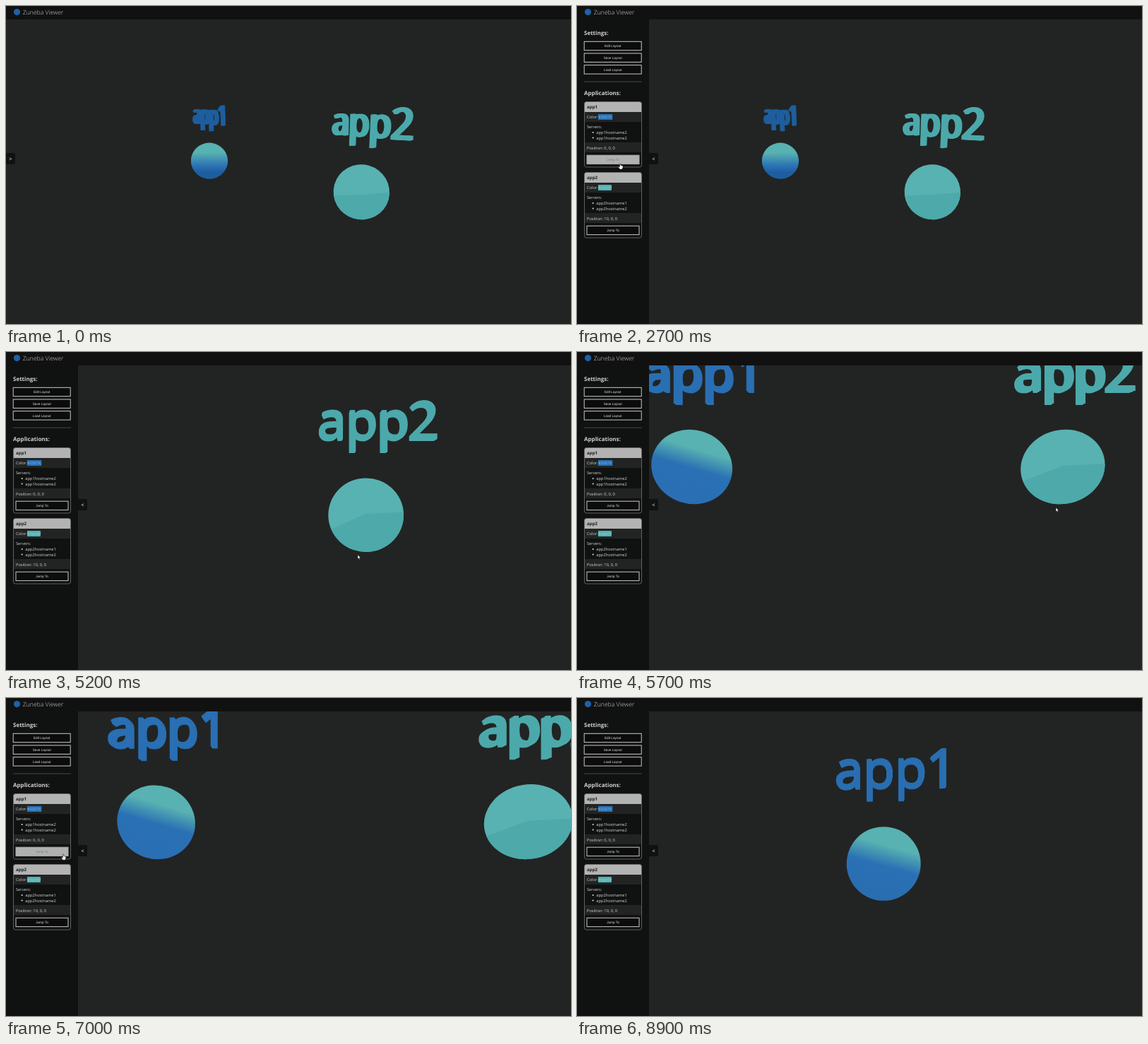
Write an HTML page with a canvas that moves like this. It is 800 by 450 pixels and loops after 9000 ms.

```html
<!DOCTYPE html>
<html lang="en">
<head>
<meta charset="utf-8">
<title>Scene viewer</title>
<style>
  html, body { margin: 0; width: 100%; height: 100%; overflow: hidden; background: #222423; }
  canvas, svg { position: absolute; left: 0; top: 0; width: 800px; height: 450px; }
  svg { font: 5.7px "Open Sans", sans-serif; fill: #d4d4d4; text-rendering: geometricPrecision; }
  .heading { font-size: 8px; font-weight: 700; fill: #cfcfcf; }
  .name { font-size: 6.2px; font-weight: 700; fill: #222; }
  .button rect { fill: #0c0c0c; stroke: #c8c8c8; }
  .button text { font: 4.7px "Liberation Sans", Arial, sans-serif; text-anchor: middle; fill: #e4e4e4; }
  .button.hover rect { fill: #b0b0b0; stroke: #b0b0b0; }
  .button.hover text { fill: #777; }
</style>
</head>
<body>
<canvas id="scene" width="800" height="450"></canvas>
<svg id="ui" viewBox="0 0 800 450"></svg>
<script>
const LOOP = 9000, FOCAL = 520, CENTER_X = 400, CENTER_Y = 234.5;
const ctx = document.getElementById('scene').getContext('2d');
const ui = document.getElementById('ui');

// ---------- interface ----------
const button = (x, y, w, label, id = '') => `<g class="button" id="${id}">
  <rect x="${x + .5}" y="${y + .5}" width="${w - 1}" height="12.4"/>
  <text x="${x + w / 2}" y="${y + 8.3}">${label}</text></g>`;

const band = (y, h, fill) => `<rect x="10.5" y="${y}" width="81" height="${h}" fill="${fill}"/>`;

const card = (y, name, fill, ink, code, width, servers, position) => `
  <g transform="translate(0 ${y})">
    <rect x="10.5" y=".5" width="81" height="92.5" rx="3" fill="#101111"/>
    <path d="M10.5 15V3q0-2.5 3-2.5h75q3 0 3 2.5v12z" fill="#b3b3b3"/>
    ${band(15, 14, '#222423')}${band(58, 14, '#222423')}
    <rect x="10.5" y=".5" width="81" height="92.5" rx="3" fill="none" stroke="#6a6a6a" stroke-width=".9"/>
    <text class="name" x="14" y="9.8">${name}</text>
    <text x="14" y="24.2">Color:</text>
    <rect x="30" y="18" width="${width}" height="8" fill="${fill}"/>
    <text x="30.3" y="24.1" style="font-size:5.2px" fill="${ink}">${code}</text>
    <text x="14" y="38.4">Servers:</text>
    ${servers.map((s, i) => `<circle cx="22.7" cy="${44 + 7.5 * i}" r="1.1"/>
      <text x="27.3" y="${46 + 7.5 * i}">${s}</text>`).join('')}
    <text x="14" y="67.6">Position: ${position}</text>
    ${button(13.5, 75.7, 75, 'Jump To', name)}
  </g>`;

ui.innerHTML = `
  <g id="panel">
    <rect y="19" width="102" height="431" fill="#101111"/>
    <path d="M102 208h11q2 0 2 2v12q0 2-2 2h-11z" fill="#101111"/>
    <text id="arrow" x="108.5" y="218.8" text-anchor="middle" style="font-size:7.5px;font-weight:600">&lt;</text>
    <text class="heading" x="10" y="41">Settings:</text>
    ${['Edit', 'Save', 'Load'].map((verb, i) => button(9.7, 49.8 + 16.7 * i, 82, verb + ' Layout')).join('')}
    <rect x="10" y="106.7" width="82" height=".8" fill="#555"/>
    <text class="heading" x="10" y="125.8">Applications:</text>
    ${card(135, 'app1', '#2a70b4', '#79b8ea', '#0287fc', 20.3, ['app1hostname2', 'app1hostname2'], '0, 0, 0')}
    ${card(235, 'app2', '#55b0b0', '#8ad6d6', '#4abfbf', 18.8, ['app2hostname1', 'app2hostname2'], '10, 0, 0')}
  </g>
  <rect width="800" height="19" fill="#111"/>
  <circle cx="15.5" cy="8.6" r="4.6" fill="#1d62a6"/>
  <text x="23.8" y="12" style="font-size:8.6px;font-weight:300">Zuneba Viewer</text>
  <g id="cursor" fill="#fff" stroke="#000" stroke-width=".5">
    <path id="pointer" d="M0 0v6l1.4-1.2.9 2 1-.4-.9-2h1.8z"/>
    <path id="hand" d="M-.6 0q.8-.6 1.3.2v2.2l2.6.6q.9.3.8 1.2l-.5 2.6-.7 1.2h-3.4l-2.2-3.4q.6-.8 1.4-.1l.7.6z"/>
  </g>`;
const el = Object.fromEntries(['panel', 'arrow', 'cursor', 'pointer', 'hand', 'app1', 'app2']
  .map(id => [id, document.getElementById(id)]));

// ---------- motion ----------
const lerp = (a, b, k) => a + (b - a) * k;
const clamp = k => Math.max(0, Math.min(1, k));
const linear = k => k;
const inOut = k => k < .5 ? 2 * k * k : 1 - 2 * (1 - k) ** 2;

// Camera poses: x, y, z, yaw to the left, pitch downwards.
const START = [17.4, 3.24, 11.03, .7915, .189];
const MOVES = [
  [3350, 4250, [10, -.03, 10, .13, 0], inOut],
  [4850, 5200, [7.92, -.07, 10, 0, 0], linear],
  [5200, 5600, [4.52, -1.37, 10, 0, 0], linear],
  [6700, 7700, [0, 0, 10, .065, 0], inOut],
];
function cameraAt(t) {
  let pose = START;
  for (const [from, to, target, ease] of MOVES) {
    const k = ease(clamp((t - from) / (to - from)));
    pose = pose.map((v, i) => lerp(v, target[i], k));
  }
  return pose;
}

// Cursor path: time, x, y.
const PATH = [
  [50, 390, 362], [1000, 9, 216], [1650, 8, 216], [2000, 30, 216], [2500, 61, 223], [2750, 61, 223],
  [3050, 57, 305], [3250, 56, 317], [3600, 56, 317], [4100, 129, 325], [4400, 250, 304],
  [4850, 456, 288], [5200, 497.5, 287], [5600, 678, 220], [5750, 678, 220], [6450, 70.5, 220.5],
  [6900, 70.5, 220.5], [7500, 132, 224.5], [7750, 150, 230], [8250, 300, 322], [8350, 300, 322],
];
function cursorAt(t) {
  const i = PATH.findIndex(p => p[0] > t);
  if (i < 1) return null;
  const [a, b] = [PATH[i - 1], PATH[i]];
  const k = (t - a[0]) / (b[0] - a[0]);
  return [lerp(a[1], b[1], k), lerp(a[2], b[2], k)];
}

// ---------- scene ----------
let cam;
function toView(x, y, z) {
  const [cx, cy, cz, yaw, pitch] = cam;
  const dx = x - cx, dy = y - cy, dz = z - cz;
  const s = Math.sin(yaw), c = Math.cos(yaw), sp = Math.sin(pitch), cp = Math.cos(pitch);
  const ahead = -dx * s - dz * c;
  return [dx * c - dz * s, dy * cp + ahead * sp, ahead * cp - dy * sp];
}
function project(x, y, z) {
  const [right, up, depth] = toView(x, y, z);
  return [CENTER_X + FOCAL * right / depth, CENTER_Y - FOCAL * up / depth];
}
const mix = (a, b, k) => `rgb(${a.map((v, i) => Math.round(lerp(v, b[i], k)))})`;

const EM = 1.38, BASELINE = 2.04, THICKNESS = .2, LAYERS = 5;
function drawLabel(text, worldX, color) {
  ctx.font = '100px "Open Sans", sans-serif';
  ctx.fillStyle = ctx.strokeStyle = color;
  ctx.lineWidth = 2.8;
  ctx.lineJoin = 'miter';
  ctx.miterLimit = 3;
  const unit = EM / 100, h = .3;
  for (let layer = 0; layer <= LAYERS; layer++) {
    const z = THICKNESS * layer / LAYERS;
    let pen = worldX - 1.31;
    for (const glyph of text) {
      const width = ctx.measureText(glyph).width;
      const x = pen + width * unit / 2, y = BASELINE + .36;
      const [ox, oy] = project(x, y, z);
      const [l, r, d, u] = [[-h, 0], [h, 0], [0, -h], [0, h]].map(([i, j]) => project(x + i, y + j, z));
      const s = unit / (2 * h);
      ctx.setTransform((r[0] - l[0]) * s, (r[1] - l[1]) * s, (d[0] - u[0]) * s, (d[1] - u[1]) * s, ox, oy);
      ctx.fillText(glyph, -width / 2, .36 / unit);
      ctx.strokeText(glyph, -width / 2, .36 / unit);
      pen += width * unit;
    }
  }
  ctx.resetTransform();
}

// A unit sphere in perspective is an ellipse stretched away from the view centre.
function drawSphere(worldX, paint) {
  const [right, up, depth] = toView(worldX, 0, 0);
  const side = Math.hypot(right, up), off = Math.atan2(side, depth);
  const half = Math.asin(1 / Math.hypot(side, depth));
  const near = FOCAL * Math.tan(off - half), far = FOCAL * Math.tan(off + half);
  const major = (far - near) / 2, middle = (far + near) / 2;
  const minor = FOCAL * Math.sin(half) / Math.sqrt(Math.cos(off) ** 2 - Math.sin(half) ** 2);
  const angle = Math.atan2(-up, right);
  ctx.save();
  ctx.translate(CENTER_X + middle * Math.cos(angle), CENTER_Y + middle * Math.sin(angle));
  ctx.beginPath();
  ctx.ellipse(0, 0, major, minor, angle, 0, 2 * Math.PI);
  paint(minor, major);
  ctx.restore();
}

function drawScene() {
  const k = clamp(cam[3] / START[3]);
  ctx.fillStyle = '#222423';
  ctx.fillRect(0, 0, 800, 450);

  drawLabel('app1', 0, mix([42, 111, 179], [31, 95, 158], k));
  drawSphere(0, r => {
    const tilt = .29 * (1 - k), dx = -r * Math.sin(tilt), dy = r * Math.cos(tilt);
    const shade = ctx.createLinearGradient(-dx, -dy, dx, dy);
    shade.addColorStop(lerp(.25, .27, k), 'rgb(88,178,177)');
    shade.addColorStop(lerp(.52, .65, k), 'rgb(42,112,180)');
    shade.addColorStop(lerp(.95, .82, k), mix([42, 111, 179], [29, 94, 160], k));
    ctx.fillStyle = shade;
    ctx.fill();
  });

  drawLabel('app2', 10, 'rgb(76,169,171)');
  drawSphere(10, (r, wide) => {
    ctx.fillStyle = 'rgb(88,178,177)';
    ctx.fill();
    ctx.clip();
    ctx.beginPath();
    ctx.moveTo(-wide, r * lerp(.42, .12, k));
    ctx.lineTo(0, r * lerp(-.03, .1, k));
    ctx.lineTo(wide, r * lerp(-.08, .01, k));
    ctx.lineTo(wide, 2 * r);
    ctx.lineTo(-wide, 2 * r);
    ctx.fillStyle = 'rgb(77,169,170)';
    ctx.fill();
  });
}

function drawInterface(t) {
  const open = inOut(clamp((t - 1650) / 500));
  el.panel.setAttribute('transform', `translate(${-102 * (1 - open)} 0)`);
  el.arrow.textContent = t < 1650 ? '>' : '<';

  const at = cursorAt(t);
  el.cursor.style.display = at ? '' : 'none';
  const over = (x, y, w, h) => !!at && at[0] >= x && at[0] <= x + w && at[1] >= y && at[1] <= y + h;
  const hits = ['app1', 'app2'].map((id, i) => {
    const hit = open === 1 && over(13.5, 211 + 100 * i, 75, 13.4);
    el[id].classList.toggle('hover', hit);
    return hit;
  });
  const pointing = hits.some(Boolean) || over(102 * open, 208, 14, 16);
  el.hand.style.display = pointing ? '' : 'none';
  el.pointer.style.display = pointing ? 'none' : '';
  if (at) el.cursor.setAttribute('transform', `translate(${at})`);
}

const began = performance.now();
function frame() {
  const t = (performance.now() - began) % LOOP;
  cam = cameraAt(t);
  drawScene();
  drawInterface(t);
  requestAnimationFrame(frame);
}
frame();
</script>
</body>
</html>
```
